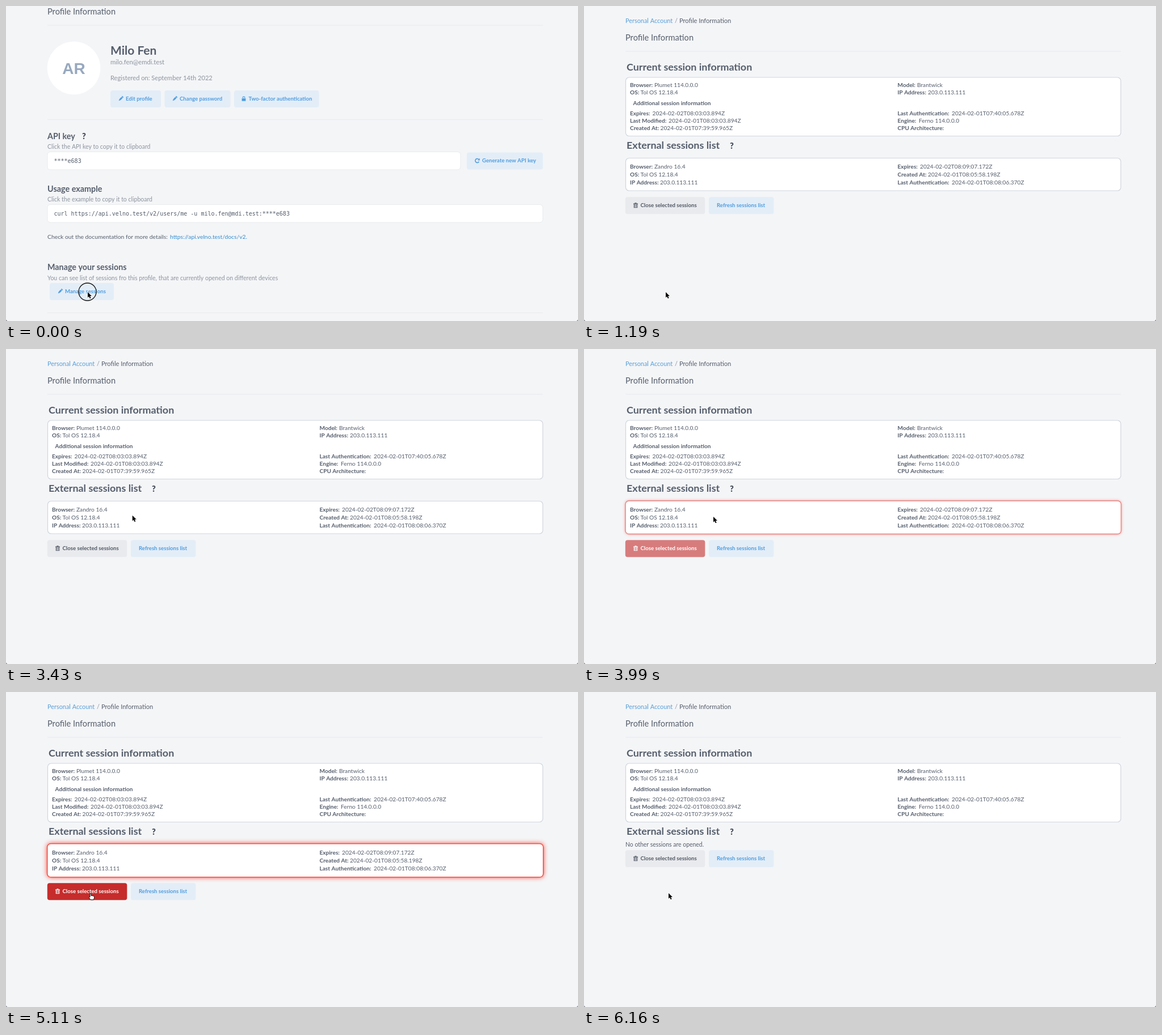
An HTML page with a canvas that plays this animation: 1008 by 556 pixels, repeating every 6.51 s.

```html
<!DOCTYPE html>
<html lang="en">
<head>
<meta charset="utf-8">
<title>Session manager</title>
<style>
  html, body { margin: 0; width: 100%; height: 100%; overflow: hidden; background: #f4f5f7; }
  canvas { display: block; width: 1008px; height: 556px; }
</style>
</head>
<body>
<canvas id="stage" width="1008" height="556"></canvas>
<script>
const ctx = document.getElementById('stage').getContext('2d');
const LOOP = 6510, STEP = 70;
const SANS = 'Lato, "Open Sans", sans-serif';
const MONO = '"DejaVu Sans Mono", monospace';
const INK = '#555e6c', MUTED = '#8d949f', BLUE = '#4f9ddf', PALE = '#e3edf7';
const GREY = [233, 234, 237], RED = [203, 50, 50], HOVER = [198, 44, 44];

const clamp = v => Math.max(0, Math.min(1, v));
const easeOut = v => 1 - (1 - clamp(v)) ** 2;
const mix = (a, b, p) => a.map((v, i) => v + (b[i] - v) * p);
const rgb = c => `rgb(${c.map(Math.round).join(',')})`;

function text(str, x, y, size = 10.6, color = INK, weight = 400, family = SANS) {
  ctx.font = `${weight} ${size}px ${family}`;
  ctx.fillStyle = color;
  ctx.fillText(str, x, y);
}
const bold = (str, x, y, size = 10.1, color = INK) => text(str, x, y, size, color, 700);
const helpMark = (x, y) => text('?', x, y, 14.5, '#454c58', 900);

function box(x, y, w, h, r, fill, stroke, width = 1) {
  ctx.beginPath();
  ctx.roundRect(x, y, w, h, r);
  ctx.fillStyle = fill;
  ctx.fill();
  if (!stroke) return;
  ctx.strokeStyle = stroke;
  ctx.lineWidth = width;
  ctx.stroke();
}

function rule(y) {
  ctx.fillStyle = '#e8eaed';
  ctx.fillRect(73, y, 873, 1);
}

function ring(x, y, r, color, width, from = 0, to = Math.PI * 2) {
  ctx.beginPath();
  ctx.arc(x, y, r, from, to);
  ctx.strokeStyle = color;
  ctx.lineWidth = width;
  ctx.stroke();
}

// Icons are drawn around their own centre.
const icons = {
  pencil() {
    ctx.rotate(Math.PI / 4);
    ctx.fillRect(-1.5, -5.2, 3, 1.8);
    ctx.fillRect(-1.5, -2.8, 3, 5.2);
    ctx.beginPath();
    ctx.moveTo(-1.5, 2.4);
    ctx.lineTo(0, 5.4);
    ctx.lineTo(1.5, 2.4);
    ctx.fill();
  },
  lock(color) {
    ctx.fillRect(-3.4, -0.6, 6.8, 4.8);
    ring(0, -1.4, 2, color, 1.3, Math.PI, 0);
  },
  refresh(color) {
    ring(0, 0, 3.5, color, 1.6, 0.5, 5.4);
    ctx.beginPath();
    ctx.moveTo(4.4, -4.4);
    ctx.lineTo(4.4, -0.6);
    ctx.lineTo(0.6, -0.6);
    ctx.fill();
  },
  trash(color) {
    ctx.fillRect(-4, -3.2, 8, 1.2);
    ctx.fillRect(-1.6, -4.5, 3.2, 1.2);
    ctx.strokeStyle = color;
    ctx.lineWidth = 1;
    ctx.strokeRect(-2.8, -2, 5.6, 6);
    for (const x of [-1.3, 0, 1.3]) ctx.fillRect(x - 0.35, -0.8, 0.7, 3.6);
  }
};

function icon(name, x, y, color) {
  ctx.save();
  ctx.translate(x, y);
  ctx.fillStyle = color;
  icons[name](color);
  ctx.restore();
}

function button(x, y, w, label, textX, glyph, fill = PALE, color = BLUE) {
  box(x, y, w, 30, 4, fill);
  if (glyph) icon(glyph, textX - 8.5, y + 14.5, color);
  bold(label, textX, y + 17.9, 9.6, color);
}

function profilePage() {
  text('Profile Information', 73, 15, 14.6);
  rule(33.5);
  ctx.beginPath();
  ctx.arc(119.5, 109.5, 46.8, 0, Math.PI * 2);
  ctx.fillStyle = '#fff';
  ctx.fill();
  text('AR', 99.3, 119.5, 28, '#98a9bf', 700, '"Liberation Sans", sans-serif');

  bold('Milo Fen', 184, 86, 21);
  text('milo.fen@emdi.test', 184, 103, 11.3, MUTED);
  text('Registered on: September 14th 2022', 184, 131, 11.1, MUTED);
  button(184, 149, 89, 'Edit profile', 211, 'pencil');
  button(279.5, 149, 116, 'Change password', 306, 'pencil');
  button(402, 149, 149.5, 'Two-factor authentication', 427.5, 'lock');
  rule(200);

  bold('API key', 73, 235, 14.3);
  helpMark(134, 235);
  text('Click the API key to copy it to clipboard', 73, 251.5, 10.5, MUTED);
  box(73, 257.5, 728, 31.5, 5, '#fff', '#e8ebee');
  text('****e683', 84.5, 277, 10, INK, 400, MONO);
  button(812, 258.5, 134, 'Generate new API key', 839, 'refresh');

  bold('Usage example', 73, 328, 14.4);
  text('Click the example to copy it to clipboard', 73, 345, 10.5, MUTED);
  box(73, 350.5, 873, 31.5, 5, '#fff', '#e8ebee');
  text('curl https://api.velno.test/v2/users/me -u milo.fen@mdi.test:****e683',
    84.5, 370, 10, INK, 400, MONO);
  text('Check out the documentation for more details:', 73, 410.5, 10.35);
  text('https://api.velno.test/docs/v2.', 289, 410.5, 10.35, '#348dcf');

  bold('Manage your sessions', 73, 466, 14.3);
  text('You can see list of sessions fro this profile, that are currently opened on different devices',
    73, 484, 10.5, MUTED);
  button(77, 489, 113, 'Manage sessions', 104, 'pencil');
  rule(541);
}

// Each row: label, label x, value, value x, baseline.
const currentRows = [
  ['Browser:', 81, 'Plumet 114.0.0.0', 124, 143],
  ['OS:', 81, 'Tol OS 12.18.4', 99.5, 156],
  ['Additional session information', 86.5, '', 0, 174.7],
  ['Expires:', 81, '2024-02-02T08:03:03.894Z', 120.5, 193],
  ['Last Modified:', 81, '2024-02-01T08:03:03.894Z', 149, 206],
  ['Created At:', 81, '2024-02-01T07:39:59.965Z', 134.5, 219],
  ['Model:', 552.5, 'Brantwick', 587, 143],
  ['IP Address:', 552.5, '203.0.113.111', 606, 156],
  ['Last Authentication:', 552.5, '2024-02-01T07:40:05.678Z', 648, 193],
  ['Engine:', 552.5, 'Ferno 114.0.0.0', 590, 206],
  ['CPU Architecture:', 552.5, '', 0, 219]
];
const externalRows = [
  ['Browser:', 81, 'Zandro 16.4', 124, 286.5],
  ['OS:', 81, 'Tol OS 12.18.4', 99.5, 301],
  ['IP Address:', 81, '203.0.113.111', 134, 315.3],
  ['Expires:', 552.5, '2024-02-02T08:09:07.172Z', 592, 286.5],
  ['Created At:', 552.5, '2024-02-01T08:05:58.198Z', 606, 301],
  ['Last Authentication:', 552.5, '2024-02-01T08:08:06.370Z', 648, 315.3]
];

function rows(list) {
  for (const [label, x, value, valueX, y] of list) {
    bold(label, x, y);
    if (value) text(value, valueX, y, 10.2);
  }
}

function sessionCard(picked) {
  // The outline moves outwards and its glow widens as the card is picked.
  const out = 0.8 * picked;
  const edge = rgb(mix([207, 213, 221], [240, 84, 74], picked));
  ctx.save();
  ctx.shadowColor = `rgba(255,45,30,${picked})`;
  ctx.shadowBlur = 8.5 * picked;
  box(73.5 - out, 268.5 - out, 872.5 + 2 * out, 57.5 + 2 * out, 6, '#fff');
  ctx.restore();
  box(73.5 - out, 268.5 - out, 872.5 + 2 * out, 57.5 + 2 * out, 6, '#fff', edge, 1.2 + 0.4 * picked);
  rows(externalRows);
}

function spinner(y, t) {
  const turn = (t - 5880) / 1000 * Math.PI * 2;
  ring(73, y, 5.8, '#3c82c6', 1.5, turn + 0.1, turn + 4.8);
}

function sessionsPage(t, overButton) {
  const loading = t < 1190 || (t >= 5810 && t < 6020);
  const emptied = t >= 6020;
  const picked = easeOut((t - 3880) / 300) * (1 - easeOut((t - 5875) / 285));
  const listY = loading ? 161 : 252;

  text('Personal Account', 73, 30.3, 10.9, '#589fd8');
  text('/', 160, 30.3, 11, MUTED);
  text('Profile Information', 168, 30.3, 11.1);
  text('Profile Information', 73, 61, 14.6);
  rule(79.5);
  bold('Current session information', 75, 114.3, 17.9);
  bold('External sessions list', 75, listY, 17.9);
  helpMark(257, listY);

  let buttonY = 337.2;
  if (loading) {
    spinner(126, t);
    spinner(172, t);
    buttonY = 188.8;
  } else {
    box(73.5, 126, 872.5, 103.5, 6, '#fff', '#cfd5dd', 1.2);
    rows(currentRows);
    if (emptied) {
      text('No other sessions are opened.', 73, 273, 10.45);
      buttonY = 279.3;
    } else {
      sessionCard(picked);
    }
  }
  const fill = mix(GREY, overButton ? HOVER : RED, picked);
  const label = mix([80, 88, 101], [255, 255, 255], clamp(picked * 2));
  button(72.8, buttonY, 140.5, 'Close selected sessions', 99.5, 'trash', rgb(fill), rgb(label));
  button(220, buttonY, 114.5, 'Refresh sessions list', 234, null);
}

// Pointer stops: time, x, y.
const path = [
  [1540, 144, 505], [1820, 198, 421], [1960, 198, 421], [2170, 178, 382],
  [2380, 174, 344], [2660, 216, 293], [2800, 221, 293], [3360, 221, 293],
  [3640, 228, 296], [4270, 228, 296], [4970, 148, 354], [5110, 149, 355]
];

function pointerAt(t) {
  const next = path.findIndex(p => p[0] > t);
  if (next < 0) return path[path.length - 1].slice(1);
  if (next === 0) return path[0].slice(1);
  const a = path[next - 1], b = path[next];
  return mix(a, b, (t - a[0]) / (b[0] - a[0])).slice(1);
}

const arrow = new Path2D('M0 0V9.7L2.2 7.7L3.8 11.3L5.6 10.5L4 7H7Z');
const hand = new Path2D('M-1 1Q0 -.6 1 1V4.6Q2 3.6 3 4.8Q4.2 4.1 4.9 5.2Q6.4 4.8 6.5 6.4V8.6L5.4 11.8H.3L-3.2 7.7Q-3.4 5.8 -1 7.2Z');

function pointer(x, y, isHand) {
  ctx.save();
  ctx.translate(x, y);
  ctx.lineJoin = 'round';
  if (isHand) {
    ctx.fillStyle = '#fff';
    ctx.strokeStyle = '#111';
    ctx.lineWidth = 1;
    ctx.fill(hand);
    ctx.stroke(hand);
  } else {
    ctx.strokeStyle = '#fff';
    ctx.lineWidth = 1.6;
    ctx.stroke(arrow);
    ctx.fillStyle = '#000';
    ctx.fill(arrow);
  }
  ctx.restore();
}

function corners() {
  ctx.fillStyle = '#8b8e93';
  for (const [x, dir] of [[0, 1], [1008, -1]]) {
    ctx.beginPath();
    ctx.moveTo(x, 553.5);
    ctx.lineTo(x + 2.5 * dir, 556);
    ctx.lineTo(x, 556);
    ctx.fill();
  }
}

function draw(t) {
  ctx.fillStyle = '#f4f5f7';
  ctx.fillRect(0, 0, 1008, 556);
  const [x, y] = pointerAt(t);
  const overButton = t > 4270 && t < 5810 && y >= 338 && x < 213;

  if (t < 700) profilePage();
  else sessionsPage(t, overButton);
  corners();

  if (t < 70) ring(143.5, 504.5, 15.5, '#111', 1.3);
  if (t >= 3780 && t < 3920) ring(227.5, 296, 15.5, '#111', 1.3);
  if (t >= 5670 && t < 5810) ring(149, 355, 22.5, '#111', 1.3);
  pointer(x, y, overButton);
}

const start = performance.now();
function frame() {
  const t = (performance.now() - start) % LOOP;
  draw(Math.floor(t / STEP) * STEP);
  requestAnimationFrame(frame);
}
frame();
</script>
</body>
</html>
```
